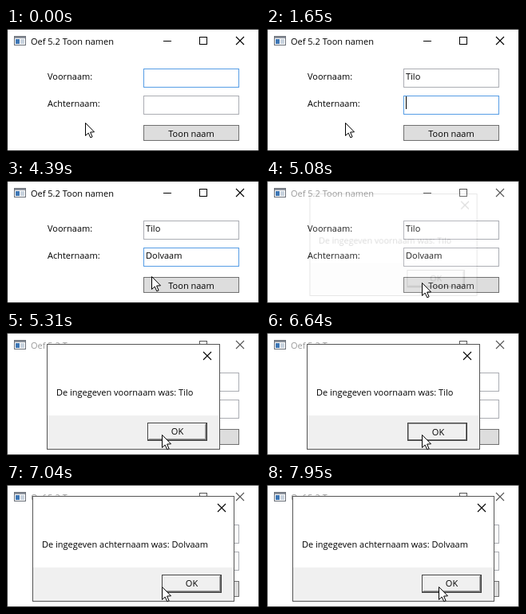
Write an HTML page with a canvas that moves like this. It is 318 by 156 pixels and loops after 8000 ms.

```html
<!DOCTYPE html>
<html lang="nl">
<head>
<meta charset="utf-8">
<title>Toon namen</title>
<style>
html, body { margin: 0; width: 100%; height: 100%; overflow: hidden; background: #fff; }
canvas { display: block; }
</style>
</head>
<body>
<canvas id="stage" width="318" height="156"></canvas>
<script>
const W = 318, H = 156, LOOP = 8000;
const FONT = '11px "Open Sans", "Noto Sans", sans-serif';
const FIRST = { text: 'Tilo', keys: [460, 780, 860, 1010] };
const LAST = { text: 'Dolvaam', keys: [2510, 2670, 2810, 3210, 3290, 3450, 3610] };

const stage = document.getElementById('stage').getContext('2d');
const layer = document.createElement('canvas');
layer.width = W;
layer.height = H;
const sheet = layer.getContext('2d');

const clamp = (v, lo, hi) => Math.min(hi, Math.max(lo, v));
const within = (t, a, b) => t >= a && t < b;
// Index of the held step: -1 before the start
const stepAt = (t, start, len) => Math.floor((t - start + 2) / len);

function box(c, x, y, w, h, fill, edge) {
  c.fillStyle = edge;
  c.fillRect(x, y, w, h);
  c.fillStyle = fill;
  c.fillRect(x + 1, y + 1, w - 2, h - 2);
}

function label(c, text, x, y, color = '#000', align = 'left') {
  c.font = FONT;
  c.textAlign = align;
  c.fillStyle = color;
  c.fillText(text, x, y);
}

function cross(c, x, y, color) {
  c.strokeStyle = color;
  c.lineWidth = 1.1;
  c.beginPath();
  c.moveTo(x - 5, y - 5);
  c.lineTo(x + 5, y + 5);
  c.moveTo(x + 5, y - 5);
  c.lineTo(x - 5, y + 5);
  c.stroke();
}

function field(c, y, name, t, focus, caret) {
  box(c, 172, y, 120, 24, '#fff', focus ? '#569de5' : '#abadb3');
  const typed = name.text.slice(0, name.keys.filter(k => t >= k).length);
  label(c, typed, 175, y + 14);
  if (caret) {
    c.fillStyle = '#000';
    c.fillRect(175 + Math.round(c.measureText(typed).width), y + 1, 1, 16);
  }
}

function appIcon(c) {
  box(c, 10, 10, 15, 12, '#fff', '#6b7078');
  c.fillStyle = '#8b919b';
  c.fillRect(11, 11, 13, 2);
  c.fillStyle = '#3f78b5';
  c.fillRect(12, 14, 5, 6);
  c.fillStyle = '#c9d3de';
  c.fillRect(18, 14, 5, 6);
}

function mainWindow(c, t, tip) {
  const active = t < 5004;
  const ink = active ? '#000' : '#555';
  box(c, 0, 0, W, H, active ? '#111' : '#333', '#000');
  c.fillStyle = '#fff';
  c.fillRect(2, 2, W - 4, H - 4);

  appIcon(c);
  label(c, 'Oef 5.2 Toon namen', 31, 21, active ? '#000' : '#999');
  c.fillStyle = ink;
  c.fillRect(197, 16, 10, 1);
  box(c, 242, 11, 10, 10, '#fff', ink);
  cross(c, 293, 16, ink);

  label(c, 'Voornaam:', 52, 65);
  label(c, 'Achternaam:', 52, 99);
  field(c, 51, FIRST, t, t < 1650, within(t, 140, 460) || within(t, 540, 1650));
  field(c, 85, LAST, t, within(t, 1650, 4930),
    within(t, 1650, 2270) || within(t, 2510, 4150) || within(t, 4690, 4930));

  const hover = active && tip.x >= 172 && tip.y >= 122;
  if (hover && t >= 4930) box(c, 172, 122, 120, 20, '#c4e5f6', '#2c628b');
  else if (hover) box(c, 172, 122, 120, 20, '#bee6fd', '#3c7fb1');
  else box(c, 172, 122, 120, 20, '#ddd', '#707070');
  label(c, 'Toon naam', 232, 137, '#000', 'center');
}

function okButton(c, x, y, pressed) {
  box(c, x, y, 75, 23, '#696969', '#404040');
  c.fillStyle = pressed ? '#a0a0a0' : '#fff';
  c.fillRect(x + 1, y + 1, 72, 20);
  c.fillStyle = pressed ? '#fff' : '#a0a0a0';
  c.fillRect(x + 2, y + 2, 71, 19);
  c.fillStyle = '#f0f0f0';
  c.fillRect(x + 2, y + 2, 70, 18);
  const d = pressed ? 1 : 0;
  label(c, 'OK', x + 37.5 + d, y + 15 + d, '#000', 'center');
}

// Message box, drawn whole and then laid over the window with scale and alpha
function dialog(c, d) {
  if (d.alpha <= 0) return;
  const { x, w, scale } = d;
  sheet.clearRect(0, 0, W, H);
  box(sheet, x, 15, w, 133, '#fff', '#555');
  sheet.fillStyle = '#f0f0f0';
  sheet.fillRect(x + 1, 105, w - 2, 42);
  if (!d.closing) cross(sheet, x + w - 16, 30, '#000');
  label(sheet, d.text, x + 12, 80);
  okButton(sheet, x + w - 91, 114, d.pressed);

  const cx = x + w / 2, cy = 81.5;
  c.save();
  c.globalAlpha = d.alpha;
  c.translate(cx, cy);
  c.scale(scale, scale);
  c.drawImage(layer, -cx, -cy);
  c.restore();
}

function opening(k) {
  const p = clamp((k - 1) / 4, 0, 1);
  return { alpha: p ** 1.4, scale: 1 - 0.1 * (1 - p) ** 4 };
}

function closing(k) {
  const p = clamp((k - 1) / 3, 0, 1);
  return { alpha: 1 - p, scale: 1 - 0.06 * p, closing: k > 1, pressed: k === 0 };
}

function cursorAt(t) {
  const p = clamp((stepAt(t, 4150, 77) + 1) / 8, 0, 1);
  const q = clamp((stepAt(t, 7680, 90) + 1) / 4, 0, 1);
  return {
    x: Math.round(99 + 96 * (1 - (1 - p) ** 2.9) + 21 * (1 - (1 - q) ** 2)),
    y: Math.round(119 + 10 * p ** 2.3)
  };
}

function arrow(c, { x, y }) {
  const pts = [[0, 0], [0, 16], [3.7, 12.6], [6.3, 18.4], [8.6, 17.4], [6.1, 11.6], [11, 11.3]];
  c.beginPath();
  for (const [dx, dy] of pts) c.lineTo(x + dx + 0.5, y + dy + 0.5);
  c.closePath();
  c.fillStyle = '#fff';
  c.fill();
  c.strokeStyle = '#000';
  c.lineWidth = 1;
  c.stroke();
}

function draw(t) {
  const tip = cursorAt(t);
  mainWindow(stage, t, tip);
  const swap = stepAt(t, 6640, 80);
  const motion = swap < 0 ? opening(stepAt(t, 4930, 76)) : closing(swap);
  dialog(stage, { x: 51, w: 217, text: 'De ingegeven voornaam was: ' + FIRST.text, ...motion });
  dialog(stage, { x: 33, w: 253, text: 'De ingegeven achternaam was: ' + LAST.text, ...opening(swap) });
  arrow(stage, tip);
}

const start = performance.now();
function tick() {
  draw((performance.now() - start) % LOOP);
  requestAnimationFrame(tick);
}
tick();
</script>
</body>
</html>
```
